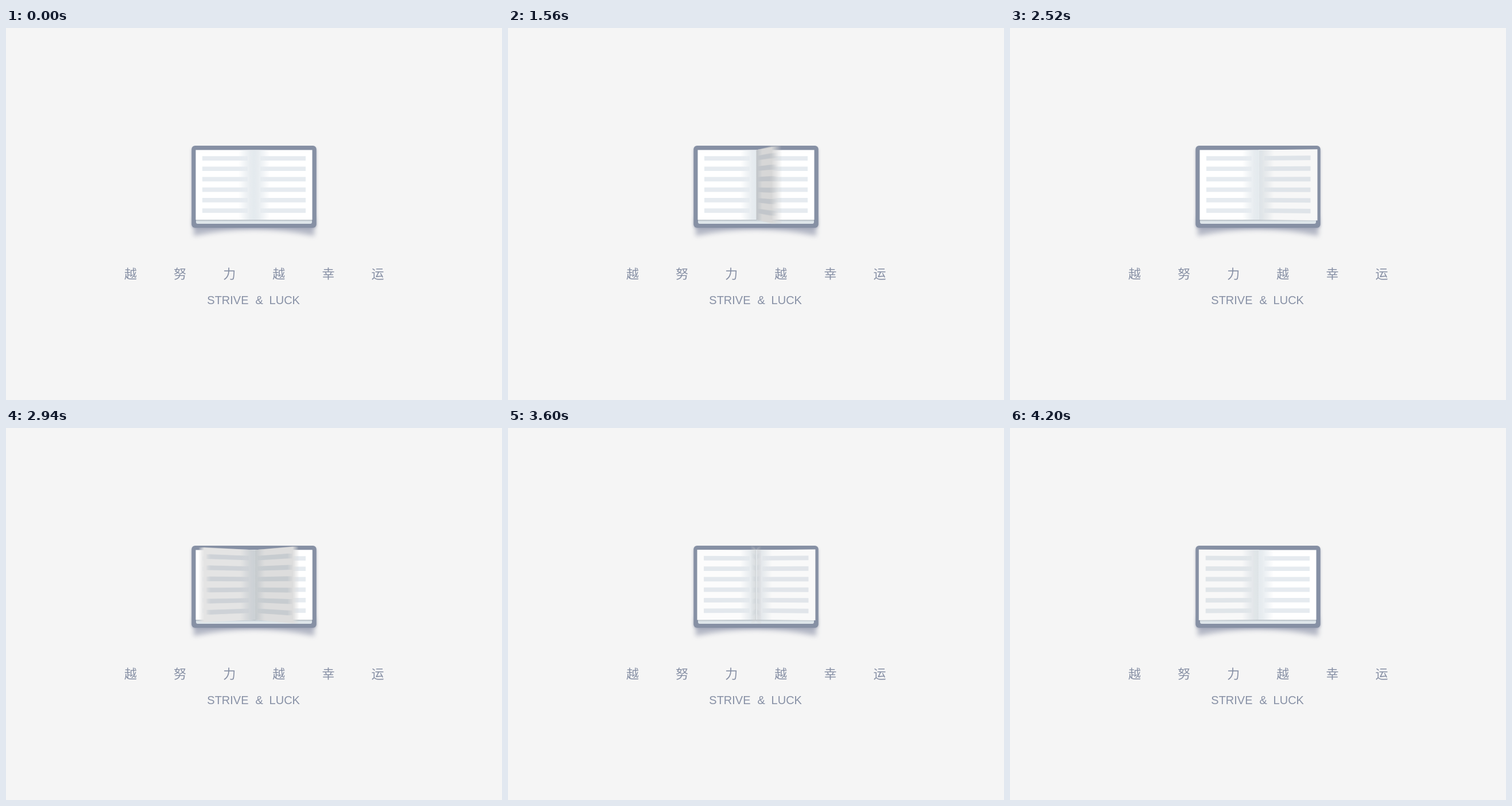
Write an HTML page with a canvas that moves like this. It is 864 by 648 pixels and loops after 4260 ms.

```html
<!DOCTYPE html>
<html lang="zh-CN">
<head>
<meta charset="utf-8">
<style>
html, body { margin: 0; width: 100%; height: 100%; overflow: hidden; background: #f5f5f5; }
canvas { display: block; }
</style>
</head>
<body>
<canvas id="stage" width="864" height="648"></canvas>
<script>
const ctx = document.getElementById('stage').getContext('2d');
const LOOP = 4260, STEP = 30, SHUTTER = 17, SAMPLES = 10;
const CX = 432, CY = 273.25, HALF = 60.75, REACH = 101.5;
const BOOK = { x: 310, y: 195, w: 244, h: 185 };

// Each page turn: start, upright moment, end, and how late it speeds up
const turns = [
  [1040, 1590, 1815, 3.7],
  [2240, 2650, 2800, 5.8],
  [2450, 2875, 3055, 4],
  [2580, 3010, 3400, 3],
  [2930, 3431, 3640, 3.7],
  [2975, 3600, 3940, 3.7],
  [3360, 4103, 4235, 2.1]
];

function layer(w, h) {
  const c = document.createElement('canvas');
  c.width = w;
  c.height = h;
  return c.getContext('2d');
}
const back = layer(864, 648);
const book = layer(BOOK.w, BOOK.h);
book.translate(-BOOK.x, -BOOK.y);

function angle([start, mid, end, power], t) {
  if (t <= start) return 0;
  if (t >= end) return Math.PI;
  const q = Math.PI / 2;
  return t < mid
    ? q * ((t - start) / (mid - start)) ** power
    : Math.PI - q * ((end - t) / (end - mid)) ** 2;
}

// Project a point of a page: r from the spine, v above or below its middle
function project(r, v, lift, side) {
  const z = r / REACH * Math.sin(lift);
  return [CX + side * r * Math.cos(lift) / (1 - 0.2 * z), CY + v / (1 - 0.12 * z)];
}

function quad(g, r0, r1, v0, v1, lift, side) {
  g.beginPath();
  for (const [r, v] of [[r0, v0], [r1, v0], [r1, v1], [r0, v1]]) {
    g.lineTo(...project(r, v, lift, side));
  }
  g.closePath();
  g.fill();
}

function page(g, lift, side) {
  const edge = project(REACH, 0, lift, side)[0];
  const inner = lift > 0 ? side * 1.5 : 0;
  const outline = () => quad(g, inner, REACH, -HALF, HALF, lift, side);
  g.fillStyle = '#fff';
  outline();
  g.fillStyle = '#e6ebf0';
  for (let i = 0; i < 6; i++) {
    const v = 223.2 + i * 18.2 - CY;
    quad(g, 11, 90, v, v + 7.7, lift, side);
  }
  const fold = g.createLinearGradient(CX, 0, edge, 0);
  fold.addColorStop(0, 'rgba(228,234,238,1)');
  fold.addColorStop(0.07, 'rgba(230,235,239,0.95)');
  fold.addColorStop(0.15, 'rgba(231,236,240,0.6)');
  fold.addColorStop(0.27, 'rgba(232,237,241,0)');
  g.fillStyle = fold;
  outline();
  if (lift > 0) {
    g.fillStyle = `rgba(0,0,0,${0.16 * Math.sin(lift)})`;
    outline();
  }
}

function box(g, x, y, w, h, r, fill) {
  g.fillStyle = fill;
  g.beginPath();
  g.roundRect(x, y, w, h, r);
  g.fill();
}

function paintBack(g) {
  g.fillStyle = '#f5f5f5';
  g.fillRect(0, 0, 864, 648);

  // Curled shadow below the cover
  g.filter = 'blur(4px)';
  g.fillStyle = 'rgba(112,121,147,0.5)';
  g.beginPath();
  g.moveTo(327, 330);
  g.lineTo(537, 330);
  g.lineTo(537, 362);
  g.quadraticCurveTo(432, 340, 327, 362);
  g.fill();
  g.filter = 'blur(2px)';
  box(g, 323, 208, 218, 141, 6, 'rgba(112,121,147,0.4)');
  g.filter = 'none';

  box(g, 323.3, 205, 217.4, 143, 6, '#8690a4');
  const strip = g.createLinearGradient(0, 333, 0, 341);
  strip.addColorStop(0, '#aeb5bd');
  strip.addColorStop(0.25, '#bcc4ca');
  strip.addColorStop(0.45, '#d9e1e6');
  strip.addColorStop(1, '#e2e9ed');
  box(g, 331, 330, 202, 11, [0, 0, 3, 3], strip);
  page(g, 0, -1);
  page(g, 0, 1);

  g.fillStyle = '#8790a5';
  g.textAlign = 'center';
  g.font = '300 22px "Noto Sans CJK SC", "Noto Sans CJK", sans-serif';
  [...'越努力越幸运'].forEach((c, i) => g.fillText(c, 217 + i * 86.1, 436));
  g.textAlign = 'left';
  g.font = '20px "Liberation Sans", Arial, sans-serif';
  g.fillText('STRIVE', 350.3, 481);
  g.fillText('&', 434.4, 481);
  g.fillText('LUCK', 458.6, 481);
}

function paintBook(t) {
  book.drawImage(back.canvas, 0, 0);
  const lifts = turns.map(turn => angle(turn, t));
  for (const a of [...lifts].reverse()) {
    if (a > 0 && a < Math.PI / 2) page(book, a, 1);
  }
  for (const a of lifts) {
    if (a >= Math.PI / 2 && a < Math.PI) page(book, Math.PI - a, -1);
  }
}

function draw(t) {
  ctx.drawImage(back.canvas, 0, 0);
  if (!turns.some(([start, , end]) => t > start - SHUTTER && t < end + SHUTTER)) return;
  // Average moments across the shutter for motion blur
  for (let i = 0; i < SAMPLES; i++) {
    paintBook(t + SHUTTER * ((i + 0.5) / SAMPLES - 0.5));
    ctx.globalAlpha = 1 / (i + 1);
    ctx.drawImage(book.canvas, BOOK.x, BOOK.y);
  }
  ctx.globalAlpha = 1;
}

paintBack(back);
const origin = performance.now();
function tick(now) {
  const t = Math.max(0, now - origin) % LOOP;
  draw(Math.floor(t / STEP) * STEP);
  requestAnimationFrame(tick);
}
draw(0);
requestAnimationFrame(tick);
</script>
</body>
</html>
```
